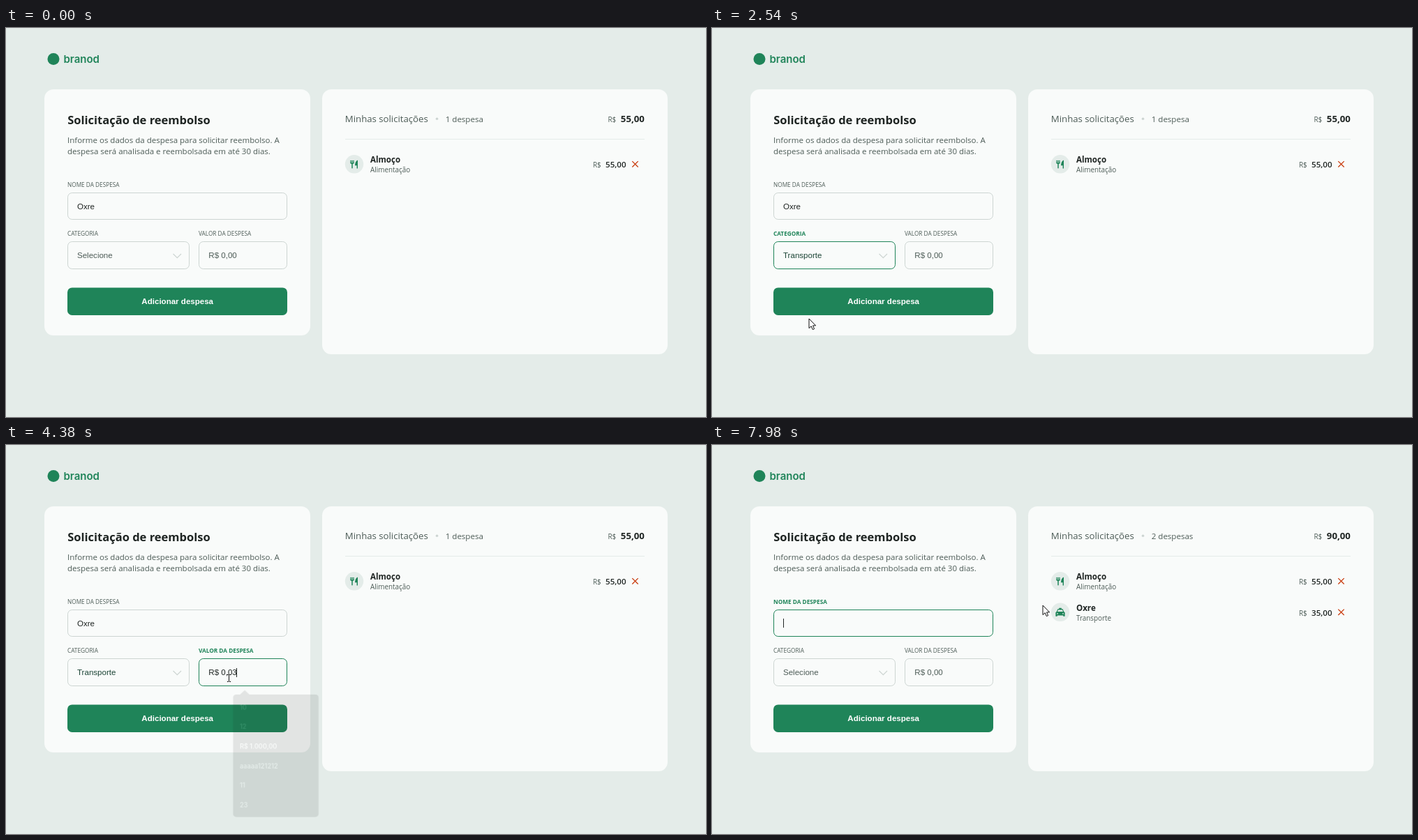
Recreate the animation shown at these times as an HTML page with a canvas. Size 1003x558 px, loop 8 s.

```html
<!DOCTYPE html>
<html lang="pt-BR">
<head>
<meta charset="utf-8">
<title>Reembolso</title>
<style>
html, body { margin: 0; width: 100%; height: 100%; overflow: hidden; background: #e4ece9; }
canvas { display: block; }
</style>
</head>
<body>
<canvas id="stage" width="1003" height="558"></canvas>
<script>
const stage = document.getElementById('stage');
let ctx = stage.getContext('2d');
const LOOP = 8000, STEP = 70;
const C = {
  page: '#e4ece9', card: '#f9fbfa', line: '#cdd5d2', ink: '#1f2523',
  soft: '#4d5c57', green: '#1f8459', hover: '#2cb178', red: '#c93b0e', chosen: '#1c4536'
};
const SANS = '"Open Sans", sans-serif', FORM = '"Liberation Sans", Arial, sans-serif';
const INTER = 'Inter, sans-serif';
const EXPENSE = 'Oxre';
const OPTIONS = ['Alimentação', 'Hospedagem', 'Serviços', 'Transporte', 'Outros'];
const HISTORY = ['10', '12', 'R$ 1.000,00', 'aaaaa121212', '11', '23'];

// Times of the events in ms
const T = { enter: 100, open: 1010, pick: 2470, focus: 3300, hint: 3380, type: 4310, press: 6330, submit: 6460 };
const CLICKS = [[940, 1220], [2320, T.pick], [T.focus, T.hint], [T.press, T.submit]];
const TYPED = [[T.type, 'R$ 0,03'], [4450, 'R$ 0,35'], [4650, 'R$ 3,50'], [4850, 'R$ 35,00']];

const easeOut = u => 1 - (1 - u) ** 2;
const easeBoth = u => u * u * (3 - 2 * u);
// Pointer moves: start, end, easing, Bézier points x and y
const MOVES = [
  [100, 870, easeOut, [958, 640, 330, 259], [545, 420, 245, 321]],
  [1210, 2250, easeBoth, [259, 235, 180, 139], [321, 375, 395, 417]],
  [2540, 3100, easeBoth, [139, 180, 290, 319.5], [417, 400, 310, 334]],
  [5770, 6260, easeBoth, [319.5, 321, 317, 317.5], [334, 350, 375, 387]],
  [6790, 7980, u => u ** 1.8, [317.5, 325, 410, 474], [387, 370, 285, 230]]
];

const ARROW = new Path2D('M0 0V13.6L3.2 10.7 5.3 15.6 7.6 14.6 5.5 9.9H9.6Z');
const HAND = new Path2D('M-1.6 9V1.2a1.5 1.5 0 0 1 3 0V6q1.5-1 2.6.3q1.6-.7 2.5.5q1.8-.5 2 1.3v4.2q0 2.5-1.7 4.2v2.5H-.5v-2q-2.6-2.2-4.6-6.2q-.9-2 .8-2.2q1.2 0 2.7 2z');

const within = (t, a, b) => t >= a && t < b;
const inBox = (p, x, y, w, h) => within(p.x, x, x + w) && within(p.y, y, y + h);

function bezier(u, [a, b, c, d]) {
  const v = 1 - u;
  return v * v * v * a + 3 * v * v * u * b + 3 * v * u * u * c + u * u * u * d;
}

function pointerAt(t) {
  const move = MOVES.filter(m => t >= m[0]).pop() || MOVES[0];
  const [start, end, ease, xs, ys] = move;
  const held = Math.max(0, Math.floor((t - start) / STEP) * STEP);
  const u = ease(Math.min(1, held / (end - start)));
  return { x: bezier(u, xs), y: bezier(u, ys) };
}

function text(str, x, y, size, color, weight = 400, family = SANS, align = 'left') {
  ctx.font = `${weight} ${size}px ${family}`;
  ctx.fillStyle = color;
  ctx.textAlign = align;
  ctx.fillText(str, x, y);
}

function box(x, y, w, h, r, fill, stroke) {
  ctx.beginPath();
  ctx.roundRect(x, y, w, h, r);
  if (fill) { ctx.fillStyle = fill; ctx.fill(); }
  if (stroke) { ctx.strokeStyle = stroke; ctx.lineWidth = 1; ctx.stroke(); }
}

function disc(x, y, r, color) {
  ctx.beginPath();
  ctx.arc(x, y, r, 0, Math.PI * 2);
  ctx.fillStyle = color;
  ctx.fill();
}

function stroke(points, color, width) {
  ctx.beginPath();
  points.forEach(([x, y], i) => i ? ctx.lineTo(x, y) : ctx.moveTo(x, y));
  ctx.strokeStyle = color;
  ctx.lineWidth = width;
  ctx.stroke();
}

function rect(x, y, w, h, color) {
  ctx.fillStyle = color;
  ctx.fillRect(x, y, w, h);
}

// Paints once onto its own canvas, to be faded as a whole
function layer(paint) {
  const main = ctx, canvas = document.createElement('canvas');
  canvas.width = stage.width;
  canvas.height = stage.height;
  ctx = canvas.getContext('2d');
  paint();
  ctx = main;
  return canvas;
}

function field(label, x, y, w, h, focused) {
  text(label, x, y - 8.5, 8.25, focused ? C.green : C.soft, focused ? 700 : 400);
  box(x + .5, y + .5, w - 1, h - 1, 6.2, null, focused ? C.green : C.line);
}

function caret(x, y) { rect(Math.round(x), y, 1, 13, C.ink); }

function foodIcon() {
  ctx.lineCap = 'round';
  for (const x of [-5, -3, -1]) stroke([[x, -5], [x, -2]], C.green, 1.1);
  stroke([[-5, -1.8], [-3, -.6], [-1, -1.8]], C.green, 1.5);
  stroke([[-3, -1], [-3, 5.5]], C.green, 1.5);
  ctx.lineCap = 'butt';
  ctx.fillStyle = C.green;
  ctx.fill(new Path2D('M5-5.7V6.2H3.6V2H.9Q1.2-4 5-5.7Z'));
}

function carIcon() {
  ctx.fillStyle = C.green;
  ctx.fill(new Path2D('M-1.8-6H1.8V-4.5H3.6L5.2-.9 6.6.5V6H4.3V4.6H-4.3V6H-6.6V.5L-5.2-.9-3.6-4.5H-1.8Z'));
  ctx.fillStyle = C.page;
  ctx.fill(new Path2D('M-3-3.2H3L4-.8H-4Z'));
  disc(-4, 2, .9, C.page);
  disc(4, 2, .9, C.page);
}

function expense(y, name, category, price, icon) {
  disc(499, y, 13.2, C.page);
  ctx.save();
  ctx.translate(499, y);
  icon();
  ctx.restore();
  text(name, 522, y - 2.3, 11.55, C.ink, 700);
  text(category, 522, y + 11.7, 9.9, C.soft);
  text('R$', 841, y + 4.7, 9.9, C.soft);
  text(price, 888.5, y + 4.7, 11.55, C.ink, 600, SANS, 'right');
  stroke([[897.3, y - 4.2], [905.7, y + 4.2]], C.red, 1.3);
  stroke([[905.7, y - 4.2], [897.3, y + 4.2]], C.red, 1.3);
}

function drawForm(t, pos) {
  const done = t >= T.submit;
  const chosen = within(t, T.pick, T.submit);
  const valueFocus = within(t, T.focus, T.press);

  box(55, 88, 381, 353, 13.2, C.card);
  text('Solicitação de reembolso', 88.2, 138, 16.5, C.ink, 700);
  text('Informe os dados da despesa para solicitar reembolso. A', 88, 165, 11.5, C.soft);
  text('despesa será analisada e reembolsada em até 30 dias.', 88, 181, 11.5, C.soft);

  field('NOME DA DESPESA', 88, 236, 315, 39, done);
  if (!done) text(EXPENSE, 102, 259.7, 11.55, C.ink, 400, FORM);
  else if (t < 6960 || t >= 7460) caret(102, 249);

  field('CATEGORIA', 88, 306, 175, 40, within(t, T.open, T.focus));
  text(chosen ? 'Transporte' : 'Selecione', 102, 330.4, 11.55, chosen ? C.chosen : C.soft, 400, FORM);
  stroke([[239.5, 324], [245.3, 329.7], [251, 324]], C.line, 1.2);

  field('VALOR DA DESPESA', 276, 306, 127, 40, valueFocus);
  const typed = done ? null : TYPED.filter(k => t >= k[0]).pop();
  const value = typed ? typed[1] : 'R$ 0,00';
  text(value, 290.3, 330.4, 11.55, typed ? C.ink : C.soft, 400, FORM);
  if (valueFocus && !within(t, 3840, 4240) && !within(t, 5380, 5880))
    caret(290 + (typed ? ctx.measureText(value).width : 0), 320);

  const over = t >= T.enter && inBox(pos, 88, 372, 315, 40) && !within(t, T.open, T.pick);
  box(88, 372.4, 315, 39.6, 6.6, over ? C.hover : C.green);
  text('Adicionar despesa', 245.7, 396.4, 11.55, '#fff', 700, FORM, 'center');
}

function drawList(done) {
  box(453, 88, 495, 380, 13.2, C.card);
  text('Minhas solicitações', 485.8, 135, 13.2, C.soft);
  disc(617.5, 130.2, 1.8, C.line);
  text(done ? '2 despesas' : '1 despesa', 629.7, 135, 11.55, C.soft);
  text('R$', 862.5, 135, 9.9, C.soft);
  text(done ? '90,00' : '55,00', 914.8, 135, 13.2, C.ink, 700, SANS, 'right');
  rect(486, 159, 429, 1, C.page);
  expense(195.3, 'Almoço', 'Alimentação', '55,00', foodIcon);
  if (done) expense(239.8, EXPENSE, 'Transporte', '35,00', carIcon);
}

function drawOptions(pos) {
  ctx.save();
  ctx.shadowColor = 'rgba(0,0,0,.4)';
  ctx.shadowBlur = 5;
  ctx.shadowOffsetX = 1;
  ctx.shadowOffsetY = 2;
  rect(88, 346, 175, 101, '#fff');
  ctx.restore();
  OPTIONS.forEach((name, i) => {
    const y = 347 + i * 19.8;
    const over = inBox(pos, 89, y, 173, 19.8);
    if (over) rect(89, Math.round(y), 173, 20, '#1967d2');
    text(name, 102, y + 14, 11.55, over ? '#fff' : C.soft, 400, FORM);
  });
  box(88.5, 346.5, 174, 100, 0, null, '#6b6b6b');
}

const history = layer(() => {
  ctx.shadowColor = 'rgba(0,0,0,.3)';
  ctx.shadowBlur = 2;
  ctx.beginPath();
  ctx.roundRect(322, 353, 129.2, 185.4, 4.5);
  ctx.moveTo(332, 353.5);
  ctx.lineTo(339.5, 346.5);
  ctx.lineTo(347, 353.5);
  ctx.fillStyle = '#1f1f1f';
  ctx.fill();
  ctx.shadowColor = 'transparent';
  HISTORY.forEach((s, i) => text(s, 332, 375.6 + i * 29.7, 9.7, '#f0f0f0', 600, INTER));
});

function drawHistory(t) {
  const [alpha, scale] = t < T.type ? [1, 1] : t < 4380 ? [.6, .98] : [.1, .946];
  ctx.save();
  ctx.globalAlpha = alpha;
  ctx.translate(386.5, 445);
  ctx.scale(scale, scale);
  ctx.drawImage(history, -386.5, -445);
  ctx.restore();
}

function drawPointer(t, pos) {
  if (CLICKS.some(([a, b]) => within(t, a, b))) disc(pos.x - .5, pos.y, 10, 'rgba(255,242,0,.5)');
  const listOpen = within(t, T.open, T.pick);
  const onText = inBox(pos, 276, 306, 127, 40) || inBox(pos, 88, 236, 315, 39);
  const onButton = inBox(pos, 88, 372, 315, 40) && !listOpen;
  ctx.save();
  if (onText) {
    ctx.translate(Math.round(pos.x - .5), Math.round(pos.y));
    rect(0, -4, 1, 9, '#111');
    for (const y of [-5, 5]) {
      rect(-2, y, 2, 1, '#111');
      rect(1, y, 2, 1, '#111');
    }
  } else {
    const shape = onButton ? HAND : ARROW;
    ctx.translate(pos.x, pos.y);
    ctx.fillStyle = '#fff';
    ctx.strokeStyle = '#111';
    ctx.lineWidth = 1;
    ctx.fill(shape);
    ctx.stroke(shape);
    if (onButton) for (const x of [1.4, 4, 6.4]) stroke([[x, 7], [x, 10]], '#111', .7);
  }
  ctx.restore();
}

function draw(t) {
  const pos = pointerAt(t);
  rect(0, 0, 1003, 558, C.page);
  disc(68, 44.5, 8.5, C.green);
  text('branod', 82.5, 50, 15, C.green, 600, INTER);
  drawForm(t, pos);
  drawList(t >= T.submit);
  if (within(t, T.open, T.pick)) drawOptions(pos);
  if (within(t, T.hint, 4450)) drawHistory(t);
  if (t >= T.enter) drawPointer(t, pos);
}

const began = performance.now();
function tick() {
  draw((performance.now() - began) % LOOP);
  requestAnimationFrame(tick);
}
tick();
</script>
</body>
</html>
```
